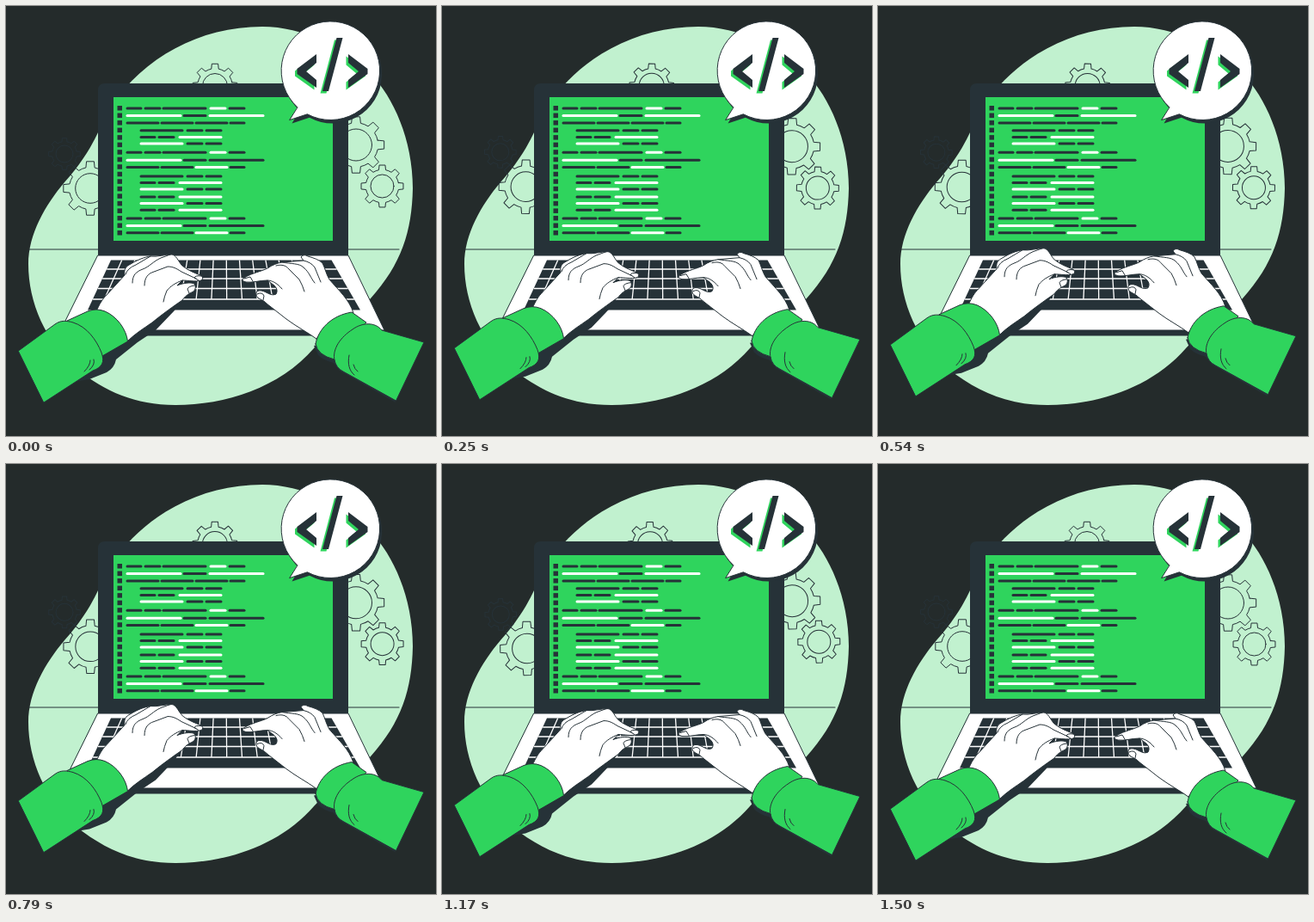
Animation, 500 px wide and 500 px high, one loop 1540 ms. Source, as an HTML page:

```html
<!DOCTYPE html>
<html lang="en">
<head>
<meta charset="utf-8">
<title>Typing on a laptop</title>
<style>
html, body { margin: 0; width: 100%; height: 100%; overflow: hidden; background: #242b2b; }
svg { display: block; width: 100%; height: 100%; }
.ink { fill: #263238; }
.green { fill: #2fd45d; }
.white { fill: #fff; }
.line { fill: none; }
.line, .edge { stroke: #263238; stroke-width: 1; stroke-linecap: round; stroke-linejoin: round; }
.code { stroke-width: 3; stroke-linecap: round; }
</style>
</head>
<body>
<svg viewBox="0 0 500 500">
  <path fill="#c1f1cf" d="M298 24C345 24 394 48 425 80C450 106 473 155 473 212C472 262 460 300 424 340C400 364 378 375 358 398C318 444 255 464 197 464C150 464 115 448 82 422C46 390 26 345 26 300C26 265 46 231 68 205C104 165 108 140 122 117C160 60 225 24 298 24Z"/>
  <path class="line" d="M27 283H457"/>
  <g id="gears"></g>

  <g id="laptop">
    <path class="white edge" d="M107 290H398L440 377H64Z"/>
    <path class="ink" d="M64 377H440V380Q440 383.500 436 383.500H68Q64 383.500 64 380Z"/>
    <path class="ink" d="M107 290V98Q107 90 115 90H390Q398 90 398 98V290Z"/>
    <path class="green" d="M125 106H380V273H125Z"/>
    <path class="ink" d="M122 295.500H378.500L412 353.500H95Z"/>
    <g id="keys" stroke="#fff" stroke-width="1.3"></g>
    <g id="code"></g>
  </g>

  <g id="arms">
    <g id="left">
      <path class="ink" d="M205 340L196 354L174 377L153 391L128 411Q126 421 117 426L97 434L60 440L110 400L150 370Z"/>
      <path class="white edge" d="M105 355C109 346 112 341 117 336L138 313C137 306 139 303 145 300C153 295 161 292 168 291C176 292 184 289 193 289C198 290 200 296 204 301C209 306 218 310 226 313Q231 316 227 319C220 321 212 319 205 319L199 325C206 322 215 321 219 323Q222 328 218 332C211 335 208 338 205 342C195 349 182 358 170 368C160 375 150 381 141 390C132 376 120 362 105 355Z"/>
      <path class="line" d="M139 312Q141 305 151 301L168 291M147 322C147 313 151 309 159 306C167 303 171 297 180 293L191 289M161 325C161 316 165 311 172 309L188 303C194 303 198 305 204 309L221 317M205 319C197 322 191 326 187 331Q184 338 183 344M227 314Q220 313 219 316L224 319M219 325Q212 326 211 329L213 334"/>
      <path class="green edge" d="M71 366L95 355Q105 351 115 355C129 361 140 376 141.500 390L112 407Z"/>
      <path class="green edge" d="M14.500 401L57 370C64 365 71 366 78 368C94 373 105 388 111 403C115 414 112 420 101 424L44 461Z"/>
      <path class="line" d="M98 412Q98 418 91 425M102 411Q104 417 97 423"/>
    </g>
    <g id="right">
      <path class="ink" d="M358 395L363 406Q369 412 381 415L388 424L453 461L440 430L380 390Z"/>
      <path class="white edge" d="M361 387C350 379 338 373 326 364L303 346C299 341 292 341 291 336Q290 330 297 331C303 332 308 338 314 335Q317 330 312 325L304 319C295 319 287 322 279 321Q272 319 277 316C287 310 296 309 304 305C310 301 315 299 321 298L346 296L343 292Q346 288 351 291C358 293 364 295 368 299C371 305 372 311 376 318C387 331 399 341 404 357C387 361 372 372 361 387Z"/>
      <path class="line" d="M304 319C310 319 316 323 321 329M314 302C321 300 326 302 329 306L341 318Q345 325 347 332M321 298C332 300 341 299 346 304C353 310 354 316 359 322M346 296Q355 298 359 304L366 321M292 335Q298 332 300 337L299 342M277 317L284 315L287 320"/>
      <path class="green edge" d="M360 393C363 376 378 360 402 356L419 368L382 411Q362 406 360 393Z"/>
      <path class="green edge" d="M382 412C379 399 389 385 403 376C414 368 429 367 437 377L486 391L453.500 459L392 425Q384 421 382 412Z"/>
      <path class="line" d="M399 406C397 416 399 424 405 429M404 417Q405 422 409 425"/>
    </g>
  </g>

  <g id="bubble"></g>
</svg>
<script>
const $ = id => document.getElementById(id);
const INK = '#263238', WHITE = '#fff';

function add(parent, tag, attrs) {
  const el = document.createElementNS('http://www.w3.org/2000/svg', tag);
  for (const k in attrs) el.setAttribute(k, attrs[k]);
  parent.appendChild(el);
  return el;
}

const polar = (cx, cy, r, a) =>
  (cx + r * Math.cos(a)).toFixed(2) + ' ' + (cy + r * Math.sin(a)).toFixed(2);

// Gear outline with eight tapered teeth and a round hole
function gear(cx, cy, r, hole) {
  const root = r * 0.78;
  const at = (rad, a) => polar(cx, cy, rad, a);
  let d = '';
  for (let i = 0; i < 8; i++) {
    const a = i * Math.PI / 4;
    d += (i ? `A${root} ${root} 0 0 1 ` : 'M') + at(root, a - 0.21) +
      'L' + at(r, a - 0.14) + 'L' + at(r, a + 0.14) + 'L' + at(root, a + 0.21);
  }
  d += `A${root} ${root} 0 0 1 ` + at(root, -0.21) + 'Z';
  add($('gears'), 'path', { d, class: 'line' });
  add($('gears'), 'circle', { cx, cy, r: hole, class: 'line' });
}
gear(98, 212, 31.5, 17.3);
gear(68, 172, 18.5, 10);
gear(243, 93, 26, 14.5);
gear(407, 161.5, 33, 18.5);
gear(437.5, 209.5, 24.7, 13.5);

// Keyboard grid in perspective
const TOP = 295.5, LOW = 341;
for (let i = -8; i <= 7; i++) {
  const x = 256.3 + 15.2 * i;
  add($('keys'), 'line', { x1: x, y1: TOP, x2: 254 + (x - 254) * 1.17, y2: LOW });
}
for (const y of [306, 317, 328.5, LOW]) {
  const k = y - TOP;
  add($('keys'), 'line', { x1: 122 - k * 0.46, y1: y, x2: 378.5 + k * 0.58, y2: y });
}

// Line layouts: dash ends in pairs; each row picks a layout, upper case = white dash
const layouts = {
  a: [141, 157, 162, 179, 183, 232, 238, 255, 260, 277],
  b: [141, 203, 207, 232, 237, 299],
  c: [141, 177, 181, 217, 221, 257, 261, 277],
  d: [157, 205, 211, 228, 233, 250],
  e: [157, 173, 178, 195, 202, 250]
};
const rows = [
  [119, 'aaaAa'], [127.5, 'BbB'], [136, 'cccc'], [144.8, 'ddd'], [152.5, 'eeE'], [160, 'Ddd'],
  [170.2, 'aaaAa'], [179.3, 'Bbb'], [187.5, 'ccCc'], [198, 'ddd'], [205.5, 'eeE'], [213, 'Ddd'],
  [222, 'eeE'], [229.5, 'Ddd'], [237.3, 'eeE'], [247, 'aaaAa'], [255.5, 'Bbb'], [263.8, 'ccCc']
];
rows.forEach(([y, marks], n) => {
  const ends = layouts[marks[0].toLowerCase()];
  [...marks].forEach((m, i) => add($('code'), 'line', {
    x1: ends[2 * i], x2: ends[2 * i + 1], y1: y, y2: y,
    class: 'code', stroke: m < 'a' ? WHITE : INK
  }));
  add($('code'), 'rect', { x: 129.5, y: 116 + n * 8.53, width: 5.5, height: 5.5, class: 'ink' });
});

// Speech bubble with its shadow
const rim = a => polar(377.3, 75.2, 57.3, a);
const bubble = `M${rim(2.31)}A57.3 57.3 0 1 1 ${rim(2.06)}L330 132.5Z`;
add($('bubble'), 'path', { d: bubble, class: 'ink', transform: 'translate(2.5 4)' });
add($('bubble'), 'path', { d: bubble, class: 'white edge' });

// Code tag: green copy below, dark copy above
const tag = 'M361 56V66L349 76L361 86V95L338.5 79V73Z' +
  'M384.5 37H391.5L375 99H368Z' +
  'M398 56V66L410 76L398 86V95L420.5 79V73Z';
add($('bubble'), 'path', { d: tag, class: 'green', transform: 'translate(-2.5 2.5)' });
add($('bubble'), 'path', { d: tag, class: 'ink' });

const LOOP = 1540, CYCLE = 1500, STEP = 1000 / 24;

// Triangle wave: 0 at 0, 1 at a quarter, -1 at three quarters
const swing = u => u < 0.25 ? 4 * u : u < 0.75 ? 2 - 4 * u : 4 * u - 4;

function draw(ms) {
  const frame = Math.floor((ms % LOOP + 4.9) / STEP);
  const u = Math.min(frame * STEP / CYCLE, 1);
  const lift = 10 * (1 - Math.abs(2 * u - 1));
  $('arms').setAttribute('transform', `translate(0 ${-lift})`);
  $('gears').setAttribute('transform', `rotate(${swing(u)} 256 155)`);
}

const start = performance.now();
function tick() {
  draw(performance.now() - start);
  requestAnimationFrame(tick);
}
draw(0);
requestAnimationFrame(tick);
</script>
</body>
</html>
```
